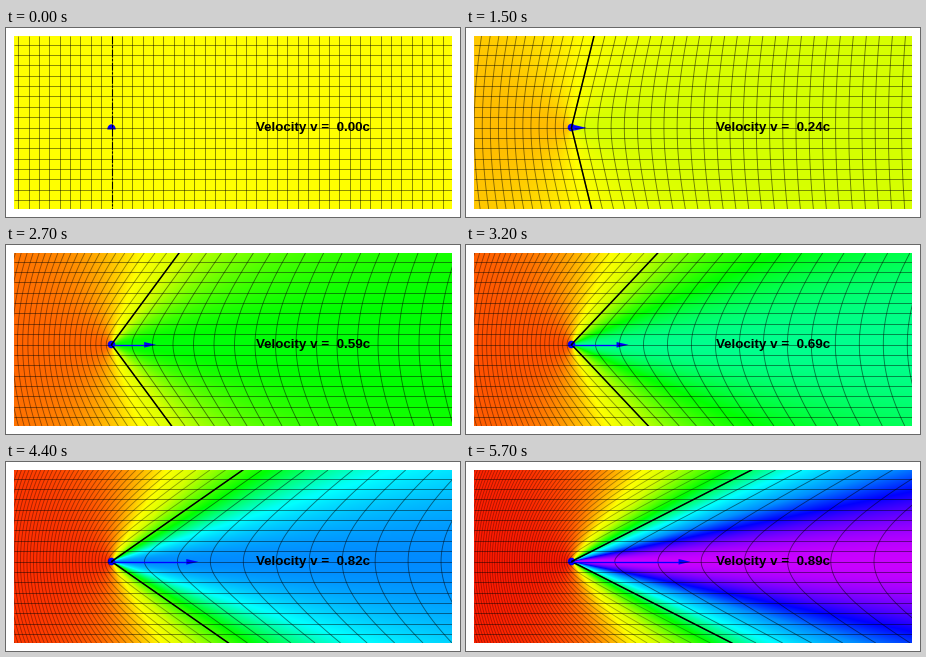
Write a matplotlib script that moves like this. It is 454 by 189 pixels and loops after 6700 ms.

```python
import numpy as np
import matplotlib.pyplot as plt
from matplotlib.animation import FuncAnimation
from matplotlib.collections import LineCollection
from matplotlib.colors import hsv_to_rgb
from matplotlib.patches import Circle, Polygon, Rectangle

W, H, DPI = 454, 189, 100
LEFT, RIGHT, TOP, BOTTOM = 8, 446, 8, 181
OX, OY = 105.5, 99.5            # observer
CELL = 10.35                    # grid spacing at rest
STEPS, HOLD = 48, 9             # speed-up steps, extra frames at rest
FRAMES, INTERVAL = 67, 100
RAPID = 0.041                   # proper velocity gained per step
ARROW = 2.48                    # arrow length gained per step
PX = 72 / DPI

# Doppler factor -> hue in degrees
DOPPLER = [0.24, 0.51, 0.78, 1.0, 1.28, 1.97, 2.58, 3.18, 3.79, 4.18]
HUE = [6, 24, 44, 60, 70, 121, 178, 207, 258, 288]

fig = plt.figure(figsize=(W / DPI, H / DPI), dpi=DPI, facecolor="white")
ax = fig.add_axes([0, 0, 1, 1])
ax.axis("off")

px, py = np.meshgrid(np.arange(LEFT, RIGHT) + 0.5 - OX,
                     np.arange(TOP, BOTTOM) + 0.5 - OY)
cos_seen = px / np.maximum(np.hypot(px, py), 1e-6)
ys = np.linspace(TOP - OY, BOTTOM - OY, 80)
columns = np.arange(-50, 35) * CELL
rows = np.arange(-8, 8) * CELL

field = ax.imshow(np.ones(px.shape + (3,)), extent=(LEFT, RIGHT, BOTTOM, TOP),
                  interpolation="nearest", aspect="auto")
ax.set_xlim(0, W)
ax.set_ylim(H, 0)
window = Rectangle((LEFT, TOP), RIGHT - LEFT, BOTTOM - TOP,
                   transform=ax.transData)


def clipped(artist):
    artist.set_clip_path(window)
    return artist


verticals = LineCollection([], colors="black", linewidths=0.9 * PX)
ax.add_collection(verticals)
clipped(verticals)
horizontals = LineCollection([[(LEFT, OY + y), (RIGHT, OY + y)] for y in rows],
                             colors="black", linewidths=0.9 * PX, alpha=0.5)
ax.add_collection(horizontals)
clipped(horizontals)

horizon = clipped(ax.plot([], [], color="black", solid_joinstyle="miter")[0])
shaft, = ax.plot([], [], color="blue", lw=1.3 * PX, solid_capstyle="butt")
head = ax.add_patch(Polygon([(0, 0)] * 3, fc="blue", ec="none"))
dot = ax.add_patch(Circle((OX, OY), 3.8, fc="blue", ec="none"))
cap_angle = np.linspace(0, np.pi, 20)
cap = ax.add_patch(Polygon(np.c_[OX + 4.2 * np.cos(cap_angle),
                                 OY + 2 - 5.2 * np.sin(cap_angle)],
                           fc="blue", ec="none"))
label = ax.text(250, 103.4, "", family="Liberation Sans", weight="bold",
                size=13.33 * PX, va="baseline")


def seen_x(x, y, gamma, gv):
    """Apparent x of a rest-frame point, light delay included."""
    return gamma * x + gv * np.hypot(x, y)


def draw(i):
    step = min(max(i - HOLD, 0), STEPS)
    gv = RAPID * step
    gamma = np.sqrt(1 + gv * gv)
    v = gv / gamma

    doppler = 1 / (gamma - gv * cos_seen)
    hue = np.interp(doppler, DOPPLER, HUE) / 360
    full = np.ones_like(hue)
    field.set_data(hsv_to_rgb(np.dstack([hue, full, full])))

    verticals.set_segments([np.c_[OX + seen_x(x, ys, gamma, gv), OY + ys]
                            for x in columns])
    squeeze = (gamma - gv) ** 0.3
    verticals.set_alpha([0.5 * squeeze if x < 0 else 0.5 for x in columns])

    edge = np.array([TOP - OY, 0, BOTTOM - OY])
    horizon.set_data(OX + seen_x(0, edge, gamma, gv), OY + edge)
    horizon.set_linewidth((1.5 if step else 1.1) * PX)
    horizon.set_linestyle("-" if step else (0, (7, 1.5, 2, 1.5)))

    tip = OX + ARROW * step
    back = max(tip - 12, OX)
    shaft.set_data([OX, back], [OY + 0.3] * 2)
    head.set_xy([(tip, OY + 0.3), (back, OY - 2.5), (back, OY + 3.1)])
    for artist in (shaft, head, dot):
        artist.set_visible(step > 0)
    cap.set_visible(step == 0)

    label.set_text(f"Velocity v =  {v:.2f}c")
    return field, verticals, horizontals, horizon, shaft, head, dot, cap, label


anim = FuncAnimation(fig, draw, frames=FRAMES, interval=INTERVAL,
                     repeat=True, repeat_delay=0)
plt.show()
```
